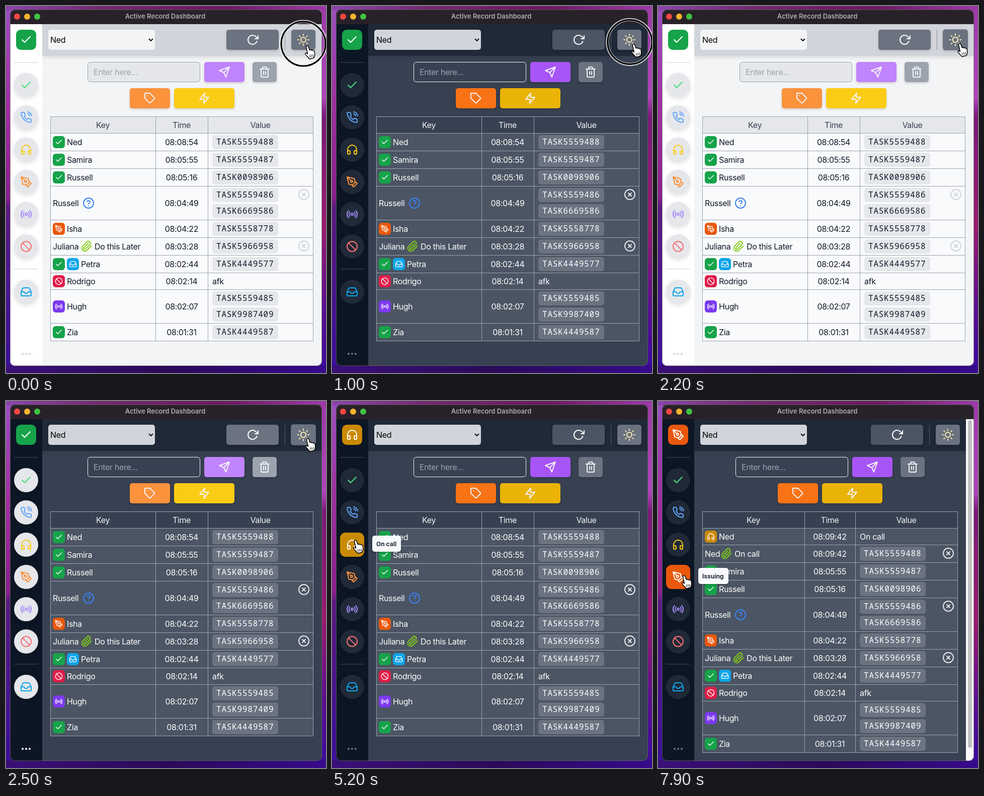
An HTML page that plays this animation: 636 by 728 pixels, repeating every 8000 ms.

```html
<!DOCTYPE html>
<html lang="en">
<head>
<meta charset="utf-8">
<title>Active Record Dashboard</title>
<style>
html, body { margin: 0; width: 100%; height: 100%; overflow: hidden; background: #4a1880; }
svg { display: block; }
#stage {
  --side: #fff; --head: #d1d5db; --main: #f3f4f6; --td: #f9fafb; --th: #e5e7eb;
  --ink: #111827; --label: #374151; --chip: #e5e7eb; --sel: #f3f4f6;
  --field: #e5e7eb; --edge: #9ca3af; --close: #d1d5db; --rule: #e5e7eb; --faded: #d1d5db;
  --p: 0%; --q: 100%; --flash: 0%;
  font: 16px Inter, "Open Sans", sans-serif;
}
#stage.dark {
  --side: #0d1624; --head: #1f2937; --main: #374151; --td: #4b5563; --th: #374151;
  --ink: #fff; --label: #f3f4f6; --chip: #6b7280; --sel: #d1d5db;
  --field: #374151; --edge: #f3f4f6; --close: #e5e7eb; --rule: #253041; --faded: #6b7280;
}
text { letter-spacing: -.35px; white-space: pre; }
.ink { fill: var(--ink); }
.label { fill: var(--label); }
.mono { font: 16px "Noto Sans Mono", "DejaVu Sans Mono", monospace; letter-spacing: .8px; fill: var(--ink); }
.title { font-weight: 600; font-size: 13px; letter-spacing: 0; fill: #b3acb2; }
.tip text { font-weight: 700; font-size: 12px; letter-spacing: 0; fill: #1f2937; }
.mid { text-anchor: middle; }
.icon { fill: none; stroke-width: 2; stroke-linecap: round; stroke-linejoin: round; }
.btn { fill: color-mix(in srgb, var(--a), var(--b) var(--p)); filter: drop-shadow(0 2px 2px rgb(0 0 0 / .16)); }
.round { --h: 0%; }
.round rect {
  fill: color-mix(in srgb, color-mix(in srgb, #e5e7eb, #1f2937 var(--p)), var(--hot) var(--h));
  filter: drop-shadow(0 3px 4px rgb(0 0 0 / .13));
}
.round .icon { stroke: color-mix(in srgb, var(--tint), #fff var(--h)); }
.tip rect { fill: #f9fafb; filter: drop-shadow(0 1px 2px rgb(0 0 0 / .25)); }
.header { fill: color-mix(in srgb, var(--head), #27ae60 var(--flash)); filter: drop-shadow(0 2px 4px rgb(0 0 0 / .12)); }
.dots { fill: color-mix(in srgb, var(--ink), var(--faded) var(--q)); }
.cell { fill: var(--td); stroke: #9ca3af; }
.cell.th { fill: var(--th); }
</style>
</head>
<body>
<svg id="stage" width="636" height="728" viewBox="0 0 636 728"></svg>
<script>
const stage = document.getElementById('stage');

const disc = (x, y, r) => `M${x - r} ${y}a${r} ${r} 0 1 0 ${2 * r} 0a${r} ${r} 0 1 0 ${-2 * r} 0`;
const big = disc(12, 12, 10);
const shapes = {
  check: 'M20 6L9 17l-5-5',
  phone: 'M15 5a5 5 0 0 1 4 4M15 1a9 9 0 0 1 8 8M22 17v3a2 2 0 0 1-2.2 2a20 20 0 0 1-8.6-3.1a19.5 19.5 0 0 1-6-6a20 20 0 0 1-3.1-8.7A2 2 0 0 1 4.1 2h3a2 2 0 0 1 2 1.7a13 13 0 0 0 .7 2.8a2 2 0 0 1-.4 2.1L8.1 9.9a16 16 0 0 0 6 6l1.3-1.3a2 2 0 0 1 2.1-.4a13 13 0 0 0 2.8.7A2 2 0 0 1 22 17z',
  headset: 'M3 18v-6a9 9 0 0 1 18 0v6M21 19a2 2 0 0 1-2 2h-1a2 2 0 0 1-2-2v-3a2 2 0 0 1 2-2h3zM3 19a2 2 0 0 0 2 2h1a2 2 0 0 0 2-2v-3a2 2 0 0 0-2-2H3z',
  pen: 'M12 19l7-7 3 3-7 7zM18 13l-1.5-7.5L2 2l3.5 14.5L13 18zM2 2l7.6 7.6' + disc(11, 11, 2),
  radio: disc(12, 12, 2) + 'M16.2 7.8a6 6 0 0 1 0 8.5M7.8 16.2a6 6 0 0 1 0-8.5M19.1 4.9a10 10 0 0 1 0 14.2M4.9 19.1a10 10 0 0 1 0-14.2',
  ban: big + 'M4.9 4.9l14.2 14.2',
  inbox: 'M22 12h-6l-2 3h-4l-2-3H2M5.5 5.1L2 12v6a2 2 0 0 0 2 2h16a2 2 0 0 0 2-2v-6l-3.5-6.9A2 2 0 0 0 16.8 4H7.2a2 2 0 0 0-1.7 1.1z',
  send: 'M22 2L11 13M22 2l-7 20-4-9-9-4z',
  trash: 'M3 6h18M19 6v14a2 2 0 0 1-2 2H7a2 2 0 0 1-2-2V6M8 6V4a2 2 0 0 1 2-2h4a2 2 0 0 1 2 2v2M10 11v6M14 11v6',
  tag: 'M20.6 13.4l-7.2 7.2a2 2 0 0 1-2.8 0L2 12V2h10l8.6 8.6a2 2 0 0 1 0 2.8zM7 7h.01',
  zap: 'M13 2L3 14h9l-1 8 10-12h-9z',
  reload: 'M23 4v6h-6M20.5 15a9 9 0 1 1-2.1-9.4L23 10',
  sun: disc(12, 12, 5) + 'M12 1v2M12 21v2M4.2 4.2l1.4 1.4M18.4 18.4l1.4 1.4M1 12h2M21 12h2M4.2 19.8l1.4-1.4M18.4 5.6l1.4-1.4',
  help: big + 'M9.1 9a3 3 0 0 1 5.8 1c0 2-3 3-3 3M12 17h.01',
  clip: 'M21.4 11l-9.2 9.2a6 6 0 0 1-8.4-8.4l9.2-9.2a4 4 0 0 1 5.6 5.6l-9.2 9.2a2 2 0 0 1-2.8-2.8l8.5-8.5',
  close: big + 'M15 9l-6 6M9 9l6 6',
};
const solid = { check: '#16a34a', headset: '#ca8a04', pen: '#ea580c', radio: '#7c3aed', ban: '#e11d48', inbox: '#0ea5e9' };

const rect = (x, y, w, h, r, attrs) => `<rect x="${x}" y="${y}" width="${w}" height="${h}" rx="${r}" ${attrs}/>`;
const text = (x, y, s, cls = 'ink') => `<text x="${x}" y="${y}" class="${cls}">${s}</text>`;
const icon = (name, cx, cy, color = '', size = 24) =>
  `<path class="icon" d="${shapes[name]}" transform="translate(${cx - size / 2} ${cy - size / 2}) scale(${size / 24})" ${color && `style="stroke:${color}"`}/>`;
const badge = (name, x, y, size, iconSize) =>
  rect(x, y, size, size, size / 4.2, `fill="${solid[name]}"`) + icon(name, x + size / 2, y + size / 2, '#fff', iconSize);
const button = (name, x, y, w, light, dark, color = '#f3f4f6') =>
  rect(x, y, w, 40, 5, `class="btn" style="--a:${light};--b:${dark}"`) + icon(name, x + w / 2, y + 20, color);
const gradient = (id, axis, stops) =>
  `<linearGradient id="${id}" x2="${axis === 'x' ? 1 : 0}" y2="${axis === 'y' ? 1 : 0}">` +
  stops.map(([at, c]) => `<stop offset="${at}" stop-color="${c}"/>`).join('') + '</linearGradient>';

// Sidebar buttons
const menu = [
  ['check', 157, '#4ade80'],
  ['phone', 221, '#60a5fa', '#2563eb', 'Next up', 62],
  ['headset', 285, '#facc15', '#ca8a04', 'On call', 57],
  ['pen', 349, '#fb923c', '#ea580c', 'Issuing', 60],
  ['radio', 413, '#a78bfa'],
  ['ban', 477, '#f87171'],
  ['inbox', 567, '#0ea5e9'],
];
const menuButton = ([name, y, tint, hot = tint]) =>
  `<g class="round" id="b-${name}" style="--tint:${tint};--hot:${hot}">${rect(16, y - 24, 48, 48, 24, '')}${icon(name, 40, y)}</g>`;
const tooltip = ([name, y, , , label, w]) => label
  ? `<g class="tip" id="t-${name}" data-y="${y - 2}">${rect(0, -16, w, 32, 5, '')}${text(8, 4.5, label, '')}</g>` : '';

// Rows: badges, name, time, values, mark, mark x, trailing label, closable
const later = [
  [['check'], 'Samira', '08:05:55', ['TASK5559487']],
  [['check'], 'Russell', '08:05:16', ['TASK0098906']],
  [[], 'Russell', '08:04:49', ['TASK5559486', 'TASK6669586'], 'help', 164, '', true],
  [['pen'], 'Isha', '08:04:22', ['TASK5558778']],
  [[], 'Juliana', '08:03:28', ['TASK5966958'], 'clip', 160, 'Do this Later', true],
  [['check', 'inbox'], 'Petra', '08:02:44', ['TASK4449577']],
  [['ban'], 'Rodrigo', '08:02:14', ['afk']],
  [['radio'], 'Hugh', '08:02:07', ['TASK5559485', 'TASK9987409']],
  [['check'], 'Zia', '08:01:31', ['TASK4449587']],
];
const before = [[['check'], 'Ned', '08:08:54', ['TASK5559488']], ...later];
const after = [
  [['headset'], 'Ned', '08:09:42', ['On call']],
  [[], 'Ned', '08:09:42', ['TASK5559488'], 'clip', 136, 'On call', true],
  ...later,
];

function table(id, cols, rows) {
  const centre = i => (cols[i] + cols[i + 1]) / 2;
  const cells = (y, h, cls) => [0, 1, 2].map(i =>
    rect(cols[i] + .5, y + .5, cols[i + 1] - cols[i], h, 0, `class="cell ${cls}"`)).join('');
  let y = 252;
  let out = cells(219, 33, 'th') +
    ['Key', 'Time', 'Value'].map((s, i) => text(centre(i), 242, s, 'label mid')).join('');
  for (const [badges, name, time, values, mark, mx, label, closable] of rows) {
    const plain = !values[0].startsWith('TASK');
    const h = plain ? 33 : 3 + 32 * values.length;
    const cy = y + h / 2 + .5;
    out += cells(y, h, '');
    badges.forEach((b, i) => out += badge(b, 93 + 28 * i, cy - 12, 24, 16));
    out += text(93 + 28 * badges.length, cy + 6, name) + text(centre(1), cy + 6, time, 'ink mid');
    if (mark) out += icon(mark, mx, cy, mark === 'help' ? '#3b82f6' : '#84cc16') + text(mx + 16, cy + 6, label);
    values.forEach((v, i) => {
      const top = y + 4 + 32 * i;
      out += plain ? text(cols[2] + 9, cy + 6, v)
        : rect(cols[2] + 9, top, 131, 28, 5, 'fill="var(--chip)"') + text(cols[2] + 17, top + 19, v, 'mono');
    });
    if (closable) out += icon('close', cols[3] - 18, y + 17, 'var(--close)');
    y += h;
  }
  return `<g id="${id}">${out}</g>`;
}

const hand = 'M-1.5 1C-2-2 2-3 3 0l2.500 6.500c1-1.500 3-1 3.500.500c1-1.200 3-.800 3.300.700c1.500-.800 2.700.300 3 2l.500 5c.200 3-1 4-1.500 7l-9 2.500C3 21-1 18-3 14.500c-.800-2 1.500-3 3-1.500l1.500 1z';
const arrow = 'M0 0v17l4-4 3 7 3-1-3-7h6z';

stage.innerHTML = `<defs>
  ${gradient('west', 'y', [[0, '#9b4fc0'], [.27, '#a02fa0'], [.52, '#8a1f8a'], [.55, '#5a1a80'], [1, '#3a0f9a']])}
  ${gradient('east', 'y', [[0, '#9d3aa8'], [.25, '#b044b8'], [.3, '#7a1a78'], [.6, '#9a1a6e'], [.82, '#5a0f90'], [1, '#3a0a9e']])}
  ${gradient('north', 'x', [[0, '#8a46a8'], [.3, '#74286f'], [.68, '#6a1a60'], [1, '#9d3aa8']])}
  ${gradient('south', 'x', [[0, '#3a1078'], [.5, '#2a0a58'], [1, '#360a8c']])}
  <clipPath id="frame">${rect(8, 7, 620, 707, 10, '')}</clipPath></defs>
  ${rect(0, 0, 318, 728, 0, 'fill="url(#west)"')}${rect(318, 0, 318, 728, 0, 'fill="url(#east)"')}
  ${rect(0, 0, 636, 9, 0, 'fill="url(#north)"')}${rect(0, 713, 636, 15, 0, 'fill="url(#south)"')}
  <g clip-path="url(#frame)">
    ${rect(8, 7, 620, 707, 0, 'fill="var(--main)"')}
    ${rect(72, 36, 556, 63, 0, 'class="header"')}
    ${rect(8, 36, 64, 678, 0, 'fill="var(--side)"')}
    ${rect(8, 7, 620, 29, 0, 'fill="#292129"')}
    <circle cx="22" cy="21" r="6" fill="#f5483f"/><circle cx="42" cy="21" r="6" fill="#f6b52d"/><circle cx="62" cy="21" r="6" fill="#3ec342"/>
    ${text(316.5, 25, 'Active Record Dashboard', 'title mid')}
    ${['check', 'headset', 'pen'].map(n => `<g id="s-${n}">${badge(n, 20, 47, 40, 24)}</g>`).join('')}
    ${rect(16, 111, 48, 2, 0, 'fill="var(--rule)"')}${rect(16, 521, 48, 2, 0, 'fill="var(--rule)"')}
    ${menu.map(menuButton).join('')}
    <g class="dots">${[33, 40, 47].map(x => `<circle cx="${x}" cy="690" r="2.100"/>`).join('')}</g>
    ${rect(84, 47, 212, 40, 5, 'fill="var(--sel)"')}
    <text x="88" y="73" fill="#000">Ned</text>
    <path class="icon" d="M284.500 65.500l3.500 3.500 3.500-3.500" stroke="#111"/>
    <g id="tools">
      ${button('reload', 438, 47, 104, '#6b7280', '#4b5563', '#fff')}
      ${rect(554, 47, 1, 40, 0, 'fill="#6b7280" opacity=".7"')}
      <g id="sun">${button('sun', 567, 47, 48, '#6b7280', '#6b7280', '#fdeeb0')}</g>
    </g>
    <g id="form">
      ${rect(162.5, 111.5, 223, 39, 5, 'fill="var(--field)" stroke="var(--edge)"')}
      <text x="174" y="137" fill="#9ca3af">Enter here...</text>
      ${button('send', 394, 111, 80, '#c084fc', '#a855f7')}
      ${button('trash', 490, 111, 48, '#9ca3af', '#6b7280')}
      ${button('tag', 246, 163, 80, '#fb923c', '#f97316')}
      ${button('zap', 334, 163, 120, '#facc15', '#eab308')}
    </g>
    ${table('before', [88, 297, 401, 610], before)}
    ${table('after', [88, 291, 392, 595], after)}
    <g id="scroll">${rect(612, 36, 16, 678, 0, 'fill="#fafafa"')}${rect(616, 38, 8, 650, 4, 'fill="#c1c1c1"')}</g>
    ${menu.map(tooltip).join('')}
  </g>
  ${rect(8.5, 7.5, 619, 706, 10, 'fill="none" stroke="#6e6570" stroke-opacity=".7"')}
  <g id="ring" fill="none"><circle r="44.500" stroke="#fff" stroke-opacity=".75" stroke-width="6"/><circle r="44" stroke="#000" stroke-width="3"/></g>
  <g id="cursor" stroke-linejoin="round">
    <g id="hand"><path d="${hand}" fill="#fff" stroke="#000" stroke-width="1.500"/><path d="M5.500 16l.800 5M8.700 15.500l.500 5M12 15l.200 5" stroke="#000" fill="none"/></g>
    <path id="arrow" d="${arrow}" fill="#000" stroke="#fff" stroke-width="1.500"/>
  </g>`;

const $ = id => document.getElementById(id);
const show = (id, on) => $(id).style.display = on ? '' : 'none';
const pct = v => (v * 100).toFixed(1) + '%';
const ease = v => v * v * (3 - 2 * v);
const ramp = (t, start, length) => ease(Math.min(1, Math.max(0, (t - start) / length)));
const within = (t, spans) => spans.some(([a, b]) => t >= a && t < b);

const LOOP = 8000, STEP = 100, SAVED = 5700;
const toggles = [[-1000, false], [20, true], [1200, false], [2500, true]];
const clicks = [[0, 100], [1000, 1200], [2300, 2500], [4200, 4400], [7600, 7800]];
const path = [[0, 598, 81], [300, 598, 80], [1200, 599, 77], [2900, 599, 76], [3600, 48, 214], [3900, 50, 220],
  [4100, 46, 278], [6600, 46, 278], [7000, 51, 348], [LOOP, 51, 348]];
const hovers = { phone: [3500, 4000], headset: [4000, 6750], pen: [6850, 9000] };

function pointer(t) {
  const i = path.findIndex(k => k[0] > t);
  const [t0, x0, y0] = path[i - 1], [t1, x1, y1] = path[i];
  const k = ramp(t, t0, t1 - t0);
  return [x0 + (x1 - x0) * k, y0 + (y1 - y0) * k];
}

function render(t) {
  const [since, dark] = toggles.findLast(k => k[0] <= t);
  const q = ramp(t, since, 300);
  const saved = t >= SAVED;
  stage.classList.toggle('dark', dark);
  stage.style.setProperty('--q', pct(q));
  stage.style.setProperty('--p', pct(dark ? q : 1 - q));
  stage.style.setProperty('--flash', pct(ramp(t, SAVED - 100, 300) - ramp(t, 6700, 300)));

  show('before', !saved);
  show('after', saved);
  show('scroll', saved);
  $('form').setAttribute('transform', `translate(${saved ? -8 : 0})`);
  $('tools').setAttribute('transform', `translate(${saved ? -15 : 0})`);

  show('s-check', t < 4400);
  show('s-headset', t >= 4400 && t < 7800);
  show('s-pen', t >= 7800);

  for (const [name, [a, b]] of Object.entries(hovers)) {
    const h = ramp(t, a, 250) - ramp(t, b, 250);
    const pop = ramp(t, a, 150) - ramp(t, b, 150);
    const el = $('b-' + name), tip = $('t-' + name);
    el.style.setProperty('--h', pct(h));
    el.firstChild.setAttribute('rx', 24 - 13 * h);
    tip.setAttribute('transform', `translate(80 ${tip.dataset.y}) scale(${pop})`);
    show('t-' + name, pop > 0);
  }

  const pressed = within(t, clicks);
  const grow = t < 3000 && !pressed ? 1.04 : 1;
  $('sun').setAttribute('transform', `translate(591 67) scale(${grow}) translate(-591 -67)`);

  const [x, y] = pointer(t);
  const travelling = t > 2950 && t < 3500;
  $('cursor').setAttribute('transform', `translate(${x} ${y})`);
  $('ring').setAttribute('transform', `translate(${x - 7} ${y - 6})`);
  show('hand', !travelling);
  show('arrow', travelling);
  show('ring', pressed);
}

const origin = performance.now();
function tick() {
  const t = (performance.now() - origin) % LOOP;
  render(Math.floor(t / STEP) * STEP);
  requestAnimationFrame(tick);
}
tick();
</script>
</body>
</html>
```
